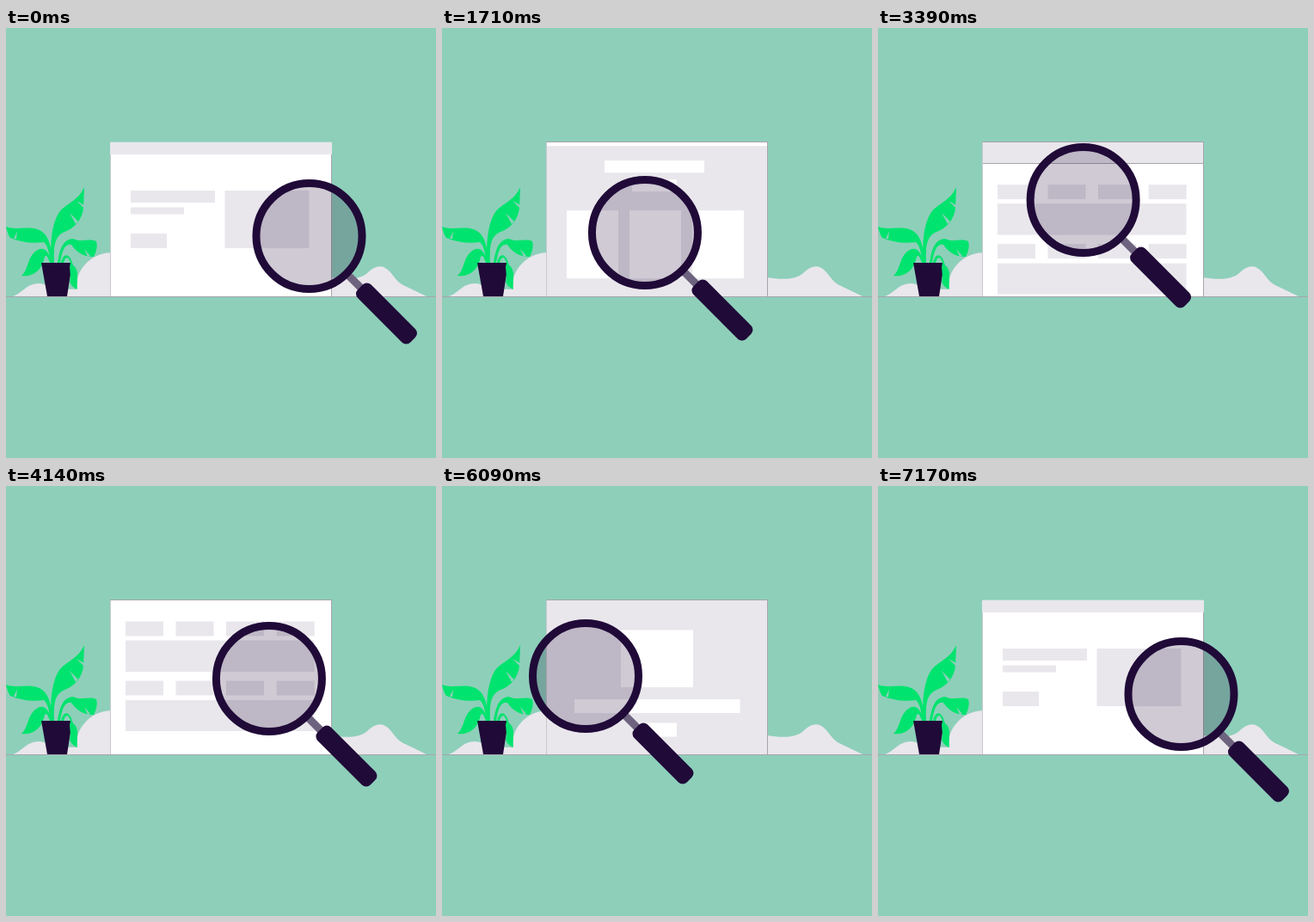
An HTML page with a canvas for the animation above (7.23 s loop, 500 by 500 pixels).

```html
<!DOCTYPE html>
<html lang="en">
<head>
<meta charset="utf-8">
<title>Page search</title>
<style>
html, body { margin: 0; width: 100%; height: 100%; overflow: hidden; background: #8ecfba; }
canvas { display: block; width: 100vw; height: 100vh; }
</style>
</head>
<body>
<canvas id="stage" width="500" height="500"></canvas>
<script>
const ctx = document.getElementById('stage').getContext('2d');
const LOOP = 7230;
const MINT = '#8ecfba', PALE = '#e9e7ec', WHITE = '#ffffff';
const INK = '#200a38', LEAF = '#00e36e', LINE = '#a6a5ad', NECK = '#6e637f';
const LEFT = 121.5, RIGHT = 378.5, TOP = 132.5, HEIGHT = 180;

// Each panel: background, block colour, blocks as [x, y, w, h] at rest.
const cRow = y => [139, 197.5, 256, 314.7].map(x => [x, y, 44, 17]);
const panels = [
  { bg: WHITE, fg: PALE, blocks: [
    [145, 189, 98, 14], [145, 208.5, 62, 8], [145, 239, 42, 17], [254.5, 189, 98, 67]] },
  { bg: PALE, fg: WHITE, blocks: [
    [189, 149.5, 116, 14], [221, 171.5, 52, 14],
    [145, 207.5, 60, 79], [218, 207.5, 60, 79], [291, 207.5, 60, 79]] },
  { bg: WHITE, fg: PALE, edge: true, blocks: [
    ...cRow(157.5), [139, 179.5, 219.5, 36.5], ...cRow(226.5), [139, 249, 219.5, 36]] },
  { bg: PALE, fg: WHITE, edge: true, blocks: [
    [208, 167.5, 84, 66.5], [154, 248, 192.5, 16], [228, 275.5, 45, 16]] }
];

// Start and end of each scroll step.
const scrolls = [[900, 1797], [2700, 3600], [4490, 5388], [6280, 7165]];

// Lens centre: [time, x, y].
const route = [
  [0, 352.5, 242], [820, 285, 231], [1710, 236, 238], [2300, 207, 229],
  [2900, 203, 207], [3390, 238.5, 200], [3790, 350, 206], [4140, 306, 224],
  [4300, 296, 234], [4700, 376, 242], [5190, 262.5, 242], [6090, 167, 221],
  [6560, 376, 219], [7160, 352.5, 242], [LOOP, 352.5, 242]
];

const ease = p => p * p * (3 - 2 * p);
const clamp = p => Math.min(1, Math.max(0, p));
const scrollAt = t => scrolls.reduce((s, [a, b]) => s + ease(clamp((t - a) / (b - a))), 0);

function grade(i, k) {
  const a = route[i], b = route[i + 1];
  return a && b ? (b[k] - a[k]) / (b[0] - a[0]) : 0;
}

// Harmonic mean of neighbouring grades keeps the curve free of overshoot.
function slope(i, k) {
  const l = i > 0 ? grade(i - 1, k) : 0, r = grade(i, k);
  return l * r > 0 ? 2 * l * r / (l + r) : 0;
}

function along(t, k) {
  let i = 0;
  while (i < route.length - 2 && t >= route[i + 1][0]) i++;
  const a = route[i], b = route[i + 1], d = b[0] - a[0];
  const u = (t - a[0]) / d, e = ease(u);
  return a[k] * (1 - e) + b[k] * e
    + d * u * (1 - u) * ((1 - u) * slope(i, k) - u * slope(i + 1, k));
}

function fill(d, color) {
  ctx.fillStyle = color;
  ctx.fill(new Path2D(d));
}

function stroke(d, color, w) {
  ctx.strokeStyle = color;
  ctx.lineWidth = w;
  ctx.stroke(new Path2D(d));
}

function scenery() {
  ctx.fillStyle = MINT;
  ctx.fillRect(0, 0, 500, 500);
  fill('M8 312C18 309 24 297 38 297C46 297 49 301 54 303L82 304C80 282 98 262 122 261V312Z', PALE);
  fill('M378 290C395 293 411 293 420 285C429 276 438 274 446 283C453 291 455 296 464 300L489 312H378Z', PALE);
}

function plant() {
  fill('M53 273C51 258 52 229 62 214C70 204 84 201 91 185L90 209C89 222 80 233 68 237C58 242 55 249 56 273Z', LEAF);
  fill('M82 201L91 206L90 209ZM74 215L84 225L81 228Z', MINT);
  fill('M0 231C12 236 26 229 39 235C48 240 51 248 53 262L55 273H52C50 262 49 253 44 249C31 251 17 249 5 244Q2 240 0 231Z', LEAF);
  fill('M13 236L12 245L9 245Z', MINT);
  fill('M18 288C27 281 24 263 39 257C47 255 49 262 55 273H51C49 267 47 263 45 266C42 282 31 290 18 288Z', LEAF);
  fill('M60 273C62 259 66 245 78 245C88 250 96 244 105 248C107 255 104 262 102 266C91 266 83 262 76 252C68 250 65 260 63 273Z', LEAF);
  fill('M91 257L98 265L95 266Z', MINT);
  fill('M41 273H77L71 312H48Z', INK);
  fill('M64 273C66 263 72 261 76 270L78 276C86 281 82 294 83 304C75 300 73 296 75 289L74 278L75 273C72 264 69 266 67 273Z', LEAF);
}

function panel(p, y) {
  ctx.fillStyle = p.bg;
  ctx.fillRect(LEFT, TOP + y, RIGHT - LEFT, HEIGHT + 1);
  ctx.fillStyle = p.fg;
  for (const [x, by, w, h] of p.blocks) ctx.fillRect(x, by + y, w, h);
  if (p.edge) {
    const line = Math.round(TOP + y - 0.5) + 0.5;
    stroke(`M${LEFT} ${line}H${RIGHT}`, LINE, 1);
  }
}

function page(scroll) {
  const at = Math.floor(scroll), shift = (scroll - at) * HEIGHT;
  ctx.save();
  ctx.beginPath();
  ctx.rect(LEFT, TOP, RIGHT - LEFT, HEIGHT);
  ctx.clip();
  panel(panels[at % 4], -shift);
  if (shift > 0) panel(panels[(at + 1) % 4], HEIGHT - shift);
  ctx.restore();

  stroke(`M${LEFT} 312V133`, '#c9c8ce', 1);
  stroke(`M${RIGHT} 133V312`, LINE, 1);

  // The first panel carries a bar that covers the frame lines.
  const first = at % 4 === 0 ? -shift : at === 3 ? HEIGHT - shift : HEIGHT;
  const y0 = Math.max(133, 133 + first), y1 = Math.min(312, 147 + first);
  if (y1 > y0) {
    ctx.fillStyle = PALE;
    ctx.fillRect(121, y0, 258, y1 - y0);
  }
  if (y1 <= 133 || y0 > 133.5) stroke(`M121 ${TOP}H379`, LINE, 1);
}

function lens(x, y) {
  ctx.save();
  ctx.translate(x, y);
  ctx.rotate(Math.PI / 4);
  ctx.fillStyle = NECK;
  ctx.fillRect(62, -4.5, 28, 9);
  ctx.fillStyle = INK;
  ctx.beginPath();
  ctx.roundRect(84, -11, 86.6, 22, 7);
  ctx.fill();
  ctx.beginPath();
  ctx.arc(0, 0, 61.5, 0, Math.PI * 2);
  ctx.globalAlpha = 0.217;
  ctx.fill();
  ctx.globalAlpha = 1;
  ctx.strokeStyle = INK;
  ctx.lineWidth = 9;
  ctx.stroke();
  ctx.restore();
}

function draw(t) {
  scenery();
  plant();
  page(scrollAt(t));
  stroke('M0 312.5H500', LINE, 1);
  lens(along(t, 1), along(t, 2));
}

const begin = performance.now();
function tick() {
  draw((performance.now() - begin) % LOOP);
  requestAnimationFrame(tick);
}
tick();
</script>
</body>
</html>
```
